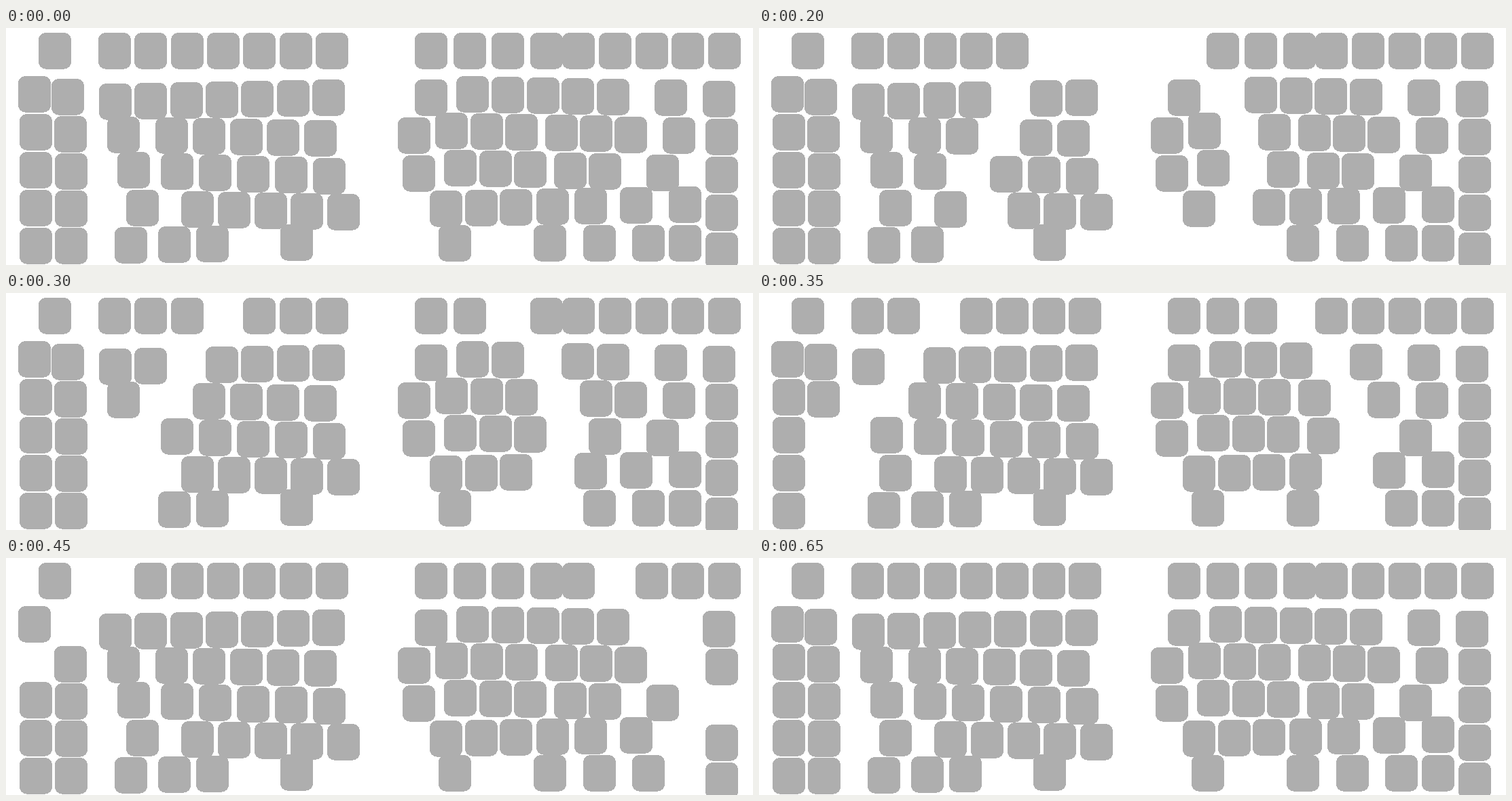
These frames come from a looping animation (1100 px wide and 350 px high, 0.7 s). An HTML page:

```html
<!DOCTYPE html>
<html lang="en">
<head>
<meta charset="utf-8">
<title>Keyboard wave</title>
<style>
  html, body { margin: 0; width: 100%; height: 100%; overflow: hidden; background: #fff; }
  svg { display: block; width: 100%; height: 100%; }
  rect { fill: #aeaeae; shape-rendering: crispEdges; animation: blink 700ms step-end infinite; }
  @keyframes blink {
    0% { visibility: hidden; }
    7.142857%, 100% { visibility: visible; }
  }
</style>
</head>
<body>
<svg id="board" viewBox="0 0 1100 350"></svg>
<script>
const STEP = 50, STEPS = 14, ROWS = 6;
const KEY = { width: 48, height: 53.5, rx: 10.5 };
const PITCH = 54, ROW_PITCH = 56, MIDDLE = 550;

const board = document.getElementById('board');
const rows = Array.from({ length: ROWS }, () => ({ left: [], right: [] }));
const clamp = (v, low, high) => Math.min(high, Math.max(low, v));
const lerp = (a, b, t) => a + (b - a) * t;

function place(row, x, y) {
  rows[row][x < MIDDLE ? 'left' : 'right'].push({ x, y });
}

// Keys spread evenly along each "first-last" span; tops slope from yStart to yEnd.
function addRow(row, spans, yStart, yEnd = yStart) {
  const xs = spans.split(' ').flatMap(span => {
    const [first, last = first] = span.split('-').map(Number);
    const gaps = Math.round((last - first) / PITCH);
    return Array.from({ length: gaps + 1 }, (_, i) => lerp(first, last, gaps ? i / gaps : 0));
  });
  const start = xs[0], length = xs[xs.length - 1] - start;
  for (const x of xs) place(row, x, lerp(yStart, yEnd, (x - start) / length));
}

// One key per row, from the second row down.
function addColumn(top, count, xAt, pitch = ROW_PITCH) {
  for (let i = 0; i < count; i++) place(i + 1, xAt(i), top + pitch * i);
}

addRow(0, '48 136-456', 7);
addRow(1, '137-451', 82, 76);
addRow(2, '149 220-439', 131, 136);
addRow(3, '164 228-452', 183, 192);
addRow(4, '177 258-473', 239, 245);
addRow(5, '160 224-280 404', 294, 290);

addRow(0, '602-772 819-1034', 7);
addRow(1, '663-870 955', 71, 76);
addRow(2, '632-735 794-896 967', 125, 132);
addRow(3, '645-748 807-858 943', 180, 187);
addRow(4, '624-727 781-837 904-976', 240, 234);
addRow(5, '637 777 850 922-976', 291);

addColumn(71, 5, i => Math.min(20, 18 + 2 * i));
addColumn(75, 5, i => Math.min(72, 67 + 4 * i), 55);
addColumn(78, 5, i => Math.min(1030, 1026 + 4 * i));
addColumn(76, 3, i => 602 - 41 * i + 16 * i * i);

function draw({ x, y }, step) {
  const key = document.createElementNS('http://www.w3.org/2000/svg', 'rect');
  const attributes = { x: Math.round(x), y: Math.round(y), ...KEY };
  for (const name in attributes) key.setAttribute(name, attributes[name]);
  key.style.animationDelay = `${(step - STEPS) * STEP}ms`;
  board.append(key);
}

// The gap starts near the middle rows and travels outwards, one key per step.
rows.forEach(({ left, right }, row) => {
  for (const side of [left, right]) side.sort((a, b) => a.x - b.x);

  const first = 1 + Math.abs(3 - row);
  const last = clamp(11 - row, 8, 10);
  left.forEach((key, i) => draw(key, Math.max(first, last - i)));

  let step = 1.5 + Math.abs(2.5 - row);
  right.forEach((key, i) => {
    // A very wide space takes an extra step to cross.
    if (i) step += Math.max(1, Math.floor((key.x - right[i - 1].x) / 70));
    draw(key, step);
  });
});
</script>
</body>
</html>
```
